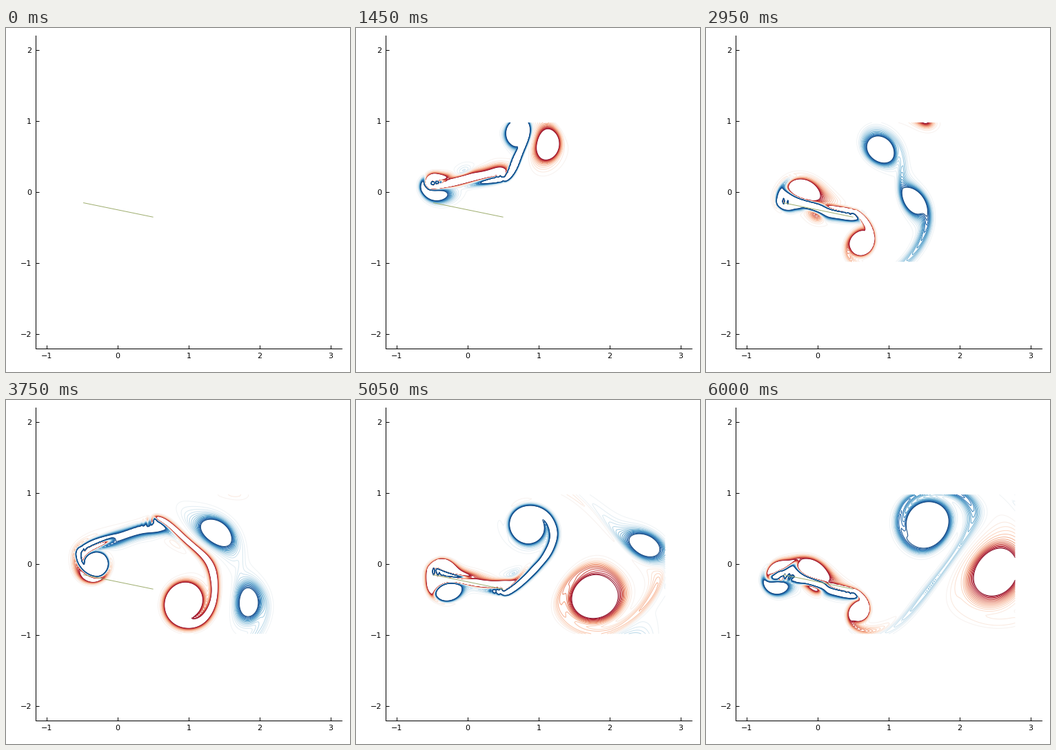
Recreate the animation shown at these times as a matplotlib script. Size 499x499 px, loop 6050 ms.

```python
import numpy as np
import matplotlib.pyplot as plt
from matplotlib.animation import FuncAnimation

SIZE, DPI = 499, 100
FRAMES, INTERVAL = 121, 50
PX = 72 / DPI
LEVELS = np.linspace(-10, 10, 30)

# Viscous flow past a heaving and pitching plate, solved for the vorticity w
# with remeshed particles and point forces that hold the no-slip condition.
STREAM, VISC = 0.5, 0.005
FRAME_TIME, SUBSTEPS = 0.025, 4
DT = FRAME_TIME / SUBSTEPS
OMEGA, SWING, LAG = 4, 0.45, 0.1

H = 0.02
NX, NY = 220, 180
X = -1.3 + H * np.arange(NX)
Y = -1.8 + H * np.arange(NY)
INSIDE = (np.abs(Y) < 1.01)[:, None] & ((X > -1.1) & (X < 2.9))
PLATE = np.linspace(-0.5, 0.5, 36)

kx = 2 * np.pi * np.fft.rfftfreq(NX)
ky = 2 * np.pi * np.fft.fftfreq(NY)[:, None]
DX, DY = 1j * np.sin(kx) / H, 1j * np.sin(ky) / H
LAP = 4 / H**2 * (np.sin(kx / 2)**2 + np.sin(ky / 2)**2)
DECAY = np.exp(-VISC * DT * LAP)
LAP[0, 0] = 1


def back(spectrum):
    return np.fft.irfft2(spectrum, s=(NY, NX))


def velocity(w):
    psi = np.fft.rfft2(w) / LAP
    # the mean terms offset the periodic copies of the flow
    drift_u = np.mean(w * (Y - Y.mean())[:, None]) / 2
    drift_v = -np.mean(w * (X - X.mean())) / 2
    return STREAM + drift_u + back(DY * psi), drift_v - back(DX * psi)


def plate(t):
    """Height and vertical speed of the plate points."""
    heave, pitch = OMEGA * t - LAG, OMEGA * t
    y = SWING * (np.sin(heave) + PLATE * np.sin(pitch))
    vy = SWING * OMEGA * (np.cos(heave) + PLATE * np.cos(pitch))
    return y, vy


def bump(d):
    """Gaussian of one cell's width and its derivative."""
    g = np.exp(-d**2 / (2 * H**2)) / (H * np.sqrt(2 * np.pi))
    return g, -d / H**2 * g


def response(z):
    """Velocity at the points z caused by unit forces at the same points."""
    d = z[:, None] - z
    r2 = np.abs(d)**2
    far = r2 + np.eye(len(z))
    e = np.exp(-r2 / (4 * H**2))
    near = e / (8 * np.pi * H**2)
    g = np.where(r2 > 0, (1 - e) / (2 * np.pi * far) - near, 0)
    turn = g * d**2 / far
    return np.block([[near + turn.real, turn.imag],
                     [turn.imag, near - turn.real]])


def no_slip(w, t):
    y, vy = plate(t)
    gx, dgx = bump(X - PLATE[:, None])
    gy, dgy = bump(Y - y[:, None])
    u, v = velocity(w)
    slip = np.concatenate([-((gy @ u) * gx).sum(1) * H**2,
                           vy - ((gy @ v) * gx).sum(1) * H**2])
    a = response(PLATE + 1j * y) + 0.5 * np.eye(2 * len(PLATE))
    fu, fv = np.split(np.linalg.solve(a, slip)[:, None], 2)
    return w + gy.T @ (fv * dgx) - dgy.T @ (fu * gx)


def sample(f, x, y):
    """Bilinear value of f at fractional grid positions."""
    i, j = np.floor(x).astype(int), np.floor(y).astype(int)
    a, b = x - i, y - j
    i0, i1, j0, j1 = i % NX, (i + 1) % NX, j % NY, (j + 1) % NY
    return ((1 - b) * ((1 - a) * f[j0, i0] + a * f[j0, i1])
            + b * ((1 - a) * f[j1, i0] + a * f[j1, i1]))


def kernel(s):
    """Cubic remeshing weights for the four nearest nodes."""
    return np.stack([-s / 2 + s**2 - s**3 / 2,
                     1 - 2.5 * s**2 + 1.5 * s**3,
                     s / 2 + 2 * s**2 - 1.5 * s**3,
                     (s**3 - s**2) / 2])


def advect(w):
    u, v = velocity(w)
    j, i = np.nonzero(INSIDE & (np.abs(w) > 3e-3))
    c = DT / H
    mx, my = i + c / 2 * u[j, i], j + c / 2 * v[j, i]
    x, y = i + c * sample(u, mx, my), j + c * sample(v, mx, my)
    ix, iy = np.floor(x).astype(int), np.floor(y).astype(int)
    near = np.arange(-1, 3)[:, None]
    cells = ((iy + near) % NY * NX)[:, None] + (ix + near) % NX
    parts = (w[j, i] * kernel(y - iy))[:, None] * kernel(x - ix)
    return np.bincount(cells.ravel(), parts.ravel(), NX * NY).reshape(NY, NX)


def simulate():
    w, t = np.zeros((NY, NX)), 0
    shown = [w]
    while len(shown) < FRAMES:
        for _ in range(SUBSTEPS):
            w = advect(no_slip(w, t))
            w = back(np.fft.rfft2(w) * DECAY)
            t += DT
        shown.append(w)
    return shown


fields = simulate()
rows = np.abs(Y) < 0.995
cols = (X > -1.01) & (X < 2.8)

fig = plt.figure(figsize=(SIZE / DPI, SIZE / DPI), dpi=DPI, facecolor="white")
ax = fig.add_axes([43 / SIZE, 34.2 / SIZE, 444 / SIZE, 453.3 / SIZE])
ax.set_xlim(-1.155, 3.155)
ax.set_ylim(-2.2, 2.2)
ax.set_xticks(range(-1, 4))
ax.set_yticks(range(-2, 3))
ax.spines[["top", "right"]].set_visible(False)
ax.spines[["left", "bottom"]].set_linewidth(PX)
ax.tick_params(direction="in", length=5 * PX, width=PX, pad=6 * PX,
               labelsize=8, labelfontfamily="DejaVu Sans")
ax.plot([-.48, .496], [-.15, -.35], color="#9fae70", lw=PX, zorder=5)
drawn = []


def draw(frame):
    while drawn:
        drawn.pop().remove()
    w = fields[frame][np.ix_(rows, cols)]
    if np.abs(w).max() > LEVELS[15]:
        drawn.append(ax.contour(X[cols], Y[rows], w, levels=LEVELS, cmap="RdBu",
                                vmin=-11, vmax=11, linewidths=PX,
                                linestyles="solid", zorder=2))
    return drawn


anim = FuncAnimation(fig, draw, frames=FRAMES, interval=INTERVAL,
                     init_func=lambda: [], repeat=True, repeat_delay=0)
plt.show()
```
